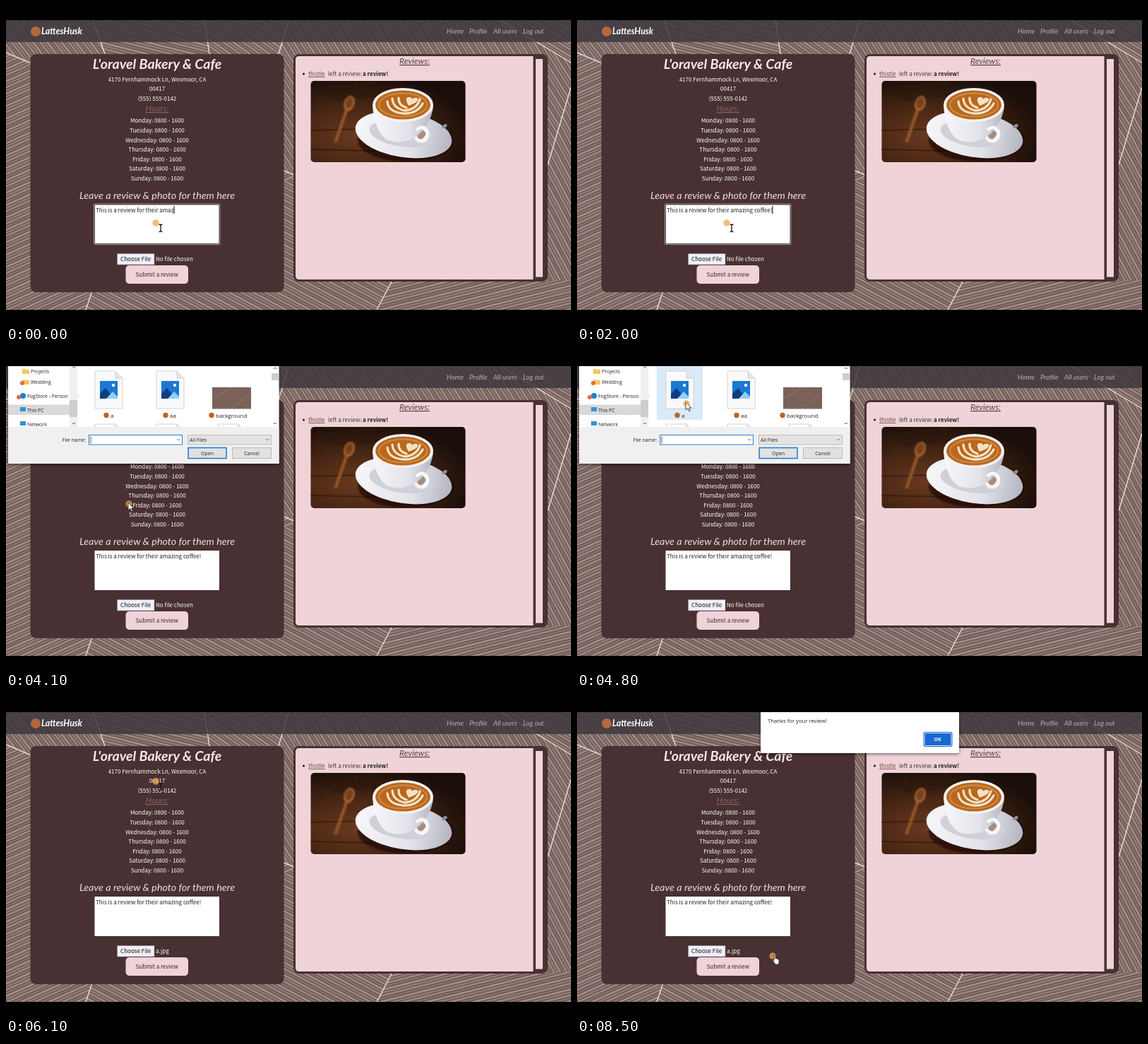
Animation, 800 px wide and 450 px high, one loop 8600 ms. Source, as an HTML page:

```html
<!DOCTYPE html>
<html lang="en">
<head>
<meta charset="utf-8">
<title>Coffee shop review</title>
<style>
  html, body { margin: 0; width: 100%; height: 100%; overflow: hidden; background: #000; }
  svg { display: block; width: 100vw; height: 100vh; }
  text { font: 8.05px "Noto Sans CJK JP", "Noto Sans CJK", "Noto Sans", sans-serif; white-space: pre; }
  .script { font-family: Lato, sans-serif; font-style: italic; }
  .ui text { font-family: "Open Sans", "Noto Sans", sans-serif; font-size: 7px; fill: #222; }
  .mid { text-anchor: middle; }
</style>
</head>
<body>
<svg viewBox="0 0 800 450">
  <defs>
    <clipPath id="photoClip"><rect x="431.500" y="106" width="219" height="115" rx="5"/></clipPath>
    <clipPath id="screen"><rect y="20" width="800" height="410"/></clipPath>
    <clipPath id="files"><rect x="3" y="20" width="372" height="86"/></clipPath>
    <radialGradient id="table" cx=".3" cy=".68" r=".75">
      <stop offset="0" stop-color="#69391f"/><stop offset=".45" stop-color="#4b2815"/>
      <stop offset="1" stop-color="#1a0e09"/>
    </radialGradient>
    <linearGradient id="china"><stop stop-color="#f7f7fa"/><stop offset=".6" stop-color="#e2e2e8"/><stop offset="1" stop-color="#b4b5c0"/></linearGradient>
    <filter id="shadow"><feDropShadow dx="0" dy="1.5" stdDeviation="2" flood-opacity=".5"/></filter>
    <filter id="soft"><feGaussianBlur stdDeviation="1.2"/></filter>
    <g id="page">
      <path d="M0 0H29L39 10V53H0Z" fill="#fafafa" stroke="#c8c8c8" stroke-width=".8"/>
      <path d="M29 0V10H39" fill="#e6e6e6" stroke="#c8c8c8" stroke-width=".8"/>
      <rect x="7" y="14" width="25" height="25" fill="#1a78d2"/>
      <path d="M7 32L15 24L27 39H7Z" fill="#0d3e80"/>
      <path d="M16 39L25 29L32 36V39Z" fill="#8fd0f6"/>
      <circle cx="26" cy="20" r="2.2" fill="#fff"/>
    </g>
  </defs>

  <rect width="800" height="450"/>
  <g clip-path="url(#screen)">
    <g id="wood"></g>
    <path d="M123 20L140 68M281 20L288 68M0 66L410 240M400 20L386 68M700 20L800 80M800 115L767 225M547 388L525 430M122 403L113 430"
      fill="none" stroke="#e8dfdc" stroke-width="1.4"/>
    <rect y="20" width="800" height="31" fill="#3c373e" opacity=".83"/>
    <circle cx="42" cy="36" r="7" fill="#b5673d"/>
    <text class="script" x="50" y="40" fill="#fff" style="font-size:12.4px;font-weight:700">LattesHusk</text>
    <g id="menu" fill="#b9afb2"></g>

    <rect x="34.500" y="68" width="359" height="337" rx="8" fill="#483033"/>
    <g class="mid" fill="#fff">
      <text class="script" x="214" y="88.500" fill="#fbe9e6" style="font-size:19.6px;font-weight:700">L'oravel Bakery &amp; Cafe</text>
      <g id="details"></g>
      <text class="script" x="214" y="149" fill="#83645d" text-decoration="underline" style="font-size:12px">Hours:</text>
      <text class="script" x="214" y="272.500" fill="#f3dcdc" style="font-size:14.3px">Leave a review &amp; photo for them here</text>
    </g>
    <rect x="125.500" y="281" width="176.500" height="56" fill="#fff"/>
    <g id="focus" fill="none">
      <rect x="124.500" y="280" width="178.500" height="57.500" rx="1" stroke="#a39a9e"/>
      <rect x="125.500" y="281" width="176.500" height="55.500" stroke="#4a4548"/>
    </g>
    <text id="review" x="127" y="291.500" fill="#222"></text>
    <rect id="caret" y="283" width="1" height="11" fill="#000"/>
    <rect x="157.500" y="350.500" width="52.500" height="15.500" fill="#eff0f8" stroke="#8d8589" stroke-width=".6"/>
    <text x="162" y="361.200" fill="#111">Choose File</text>
    <text id="fileName" x="212" y="361.200" fill="#fff"></text>
    <rect x="169.500" y="367" width="88.500" height="26" rx="5" fill="#efd3d8"/>
    <text class="mid" x="213.700" y="383" fill="#33262a">Submit a review</text>

    <rect x="407" y="68" width="360" height="322" rx="8" fill="#483033"/>
    <path d="M415 71H746.500V387H415Q410 387 410 382V76Q410 71 415 71ZM750 75H760V383.500H750Z" fill="#efd3d8"/>
    <text class="script mid" x="578.500" y="82" fill="#5b4045" text-decoration="underline" style="font-size:12px">Reviews:</text>
    <circle cx="421.500" cy="96" r="1.600" fill="#222"/>
    <text y="99" fill="#44343a"><tspan x="428" fill="#6c493b" text-decoration="underline">thistle</tspan><tspan x="456">left a review:</tspan><tspan x="505" fill="#222" font-weight="700">a review!</tspan></text>

    <g clip-path="url(#photoClip)">
      <rect x="431" y="106" width="220" height="115" fill="url(#table)"/>
      <path d="M431 176L650 170M431 203L650 208" stroke="#241008" stroke-width="2" opacity=".5"/>
      <g filter="url(#soft)">
        <g id="beans" fill="#2a150c"></g>
        <path d="M484 142L467 191" stroke="#935426" stroke-width="4.500" stroke-linecap="round"/>
        <ellipse cx="486" cy="138" rx="7.500" ry="11" fill="#a3622c" transform="rotate(20 486 138)"/>
        <ellipse cx="486" cy="137" rx="5" ry="8" fill="#74411f" transform="rotate(20 486 137)"/>
        <ellipse cx="566" cy="190" rx="68" ry="30" fill="#160b08" opacity=".6"/>
      </g>
      <ellipse cx="563" cy="182" rx="69" ry="32" fill="url(#china)" transform="rotate(9 563 182)"/>
      <ellipse cx="560" cy="181" rx="46" ry="18" fill="#cfd0d8" transform="rotate(9 560 181)"/>
      <circle cx="588" cy="182" r="9" fill="#a98d80" stroke="#f3f3f6" stroke-width="5"/>
      <path d="M519 141Q522 179 541 190Q560 196 577 187Q600 173 605 143Z" fill="url(#china)"/>
      <path d="M581 176q8 -8 14 -1t-7 17" fill="none" stroke="#f7f7fa" stroke-width="4.500"/>
      <ellipse cx="562" cy="140" rx="43" ry="24" fill="#f4f2f2"/>
      <ellipse cx="562" cy="140" rx="39" ry="20.500" fill="#b8681f"/>
      <ellipse cx="562" cy="140" rx="34" ry="16.500" fill="none" stroke="#d18a42" stroke-width="2"/>
      <g fill="none" stroke="#f4e2c6" stroke-width="3.200" stroke-linecap="round">
        <path d="M540 135Q541 150 562 152M547 131Q548 145 565 148M556 130Q555 140 567 144"/>
        <path d="M590 138Q582 153 562 152M586 132Q582 146 565 148"/>
      </g>
      <path d="M570 141Q563 129 571 129Q575 129 575 132Q579 128 583 131Q585 136 570 141Z" fill="#f4e2c6"/>
      <ellipse cx="621" cy="170" rx="4" ry="2.500" fill="#8d8b94" transform="rotate(-35 621 170)"/>
    </g>

    <g id="dialog" class="ui">
      <path d="M3 10H386.500V158H3Z" fill="#fff" filter="url(#shadow)"/>
      <path d="M3 106H386.500V158H3Z" fill="#f0f0f0"/>
      <g clip-path="url(#files)">
        <path d="M3 74.500H90V89H3Z" fill="#d9d9d9"/>
        <path d="M90 20H101V106H90ZM376 20H386V106H376Z" fill="#f0f0f0"/>
        <path d="M90 68H101V92H90Z" fill="#cdcdcd"/>
        <path d="M23 24h4l1 1h5v6H23ZM23 39h4l1 1h5v6H23Z" fill="#f4c95b"/>
        <circle cx="23" cy="44" r="3" fill="#e5654e"/>
        <circle cx="24" cy="62" r="4" fill="#1783d8"/>
        <circle cx="18" cy="64" r="3" fill="#e5654e"/>
        <path d="M20 78h8v6h-8ZM20 98h8v6h-8Z" fill="#3293d1"/>
        <text x="35" y="29.500">Projects</text><text x="35" y="44.500">Wedding</text>
        <text x="30" y="64.500">FogStore - Person</text>
        <text x="30" y="84.500">This PC</text><text x="30" y="104.500">Network</text>
        <path d="M90 60H103V66H90Z" fill="#f0f0f0"/>
        <rect id="hover" x="113" y="20" width="65" height="76" fill="#d9ebf9"/>
        <use href="#page" x="126" y="27"/><use href="#page" x="213" y="27"/>
        <use href="#page" x="126" y="102"/><use href="#page" x="213" y="102"/><use href="#page" x="300" y="102"/>
        <rect x="292" y="50" width="55" height="30.500" fill="#7a6259"/>
        <path d="M292 66L320 50M320 80L347 58" stroke="#a08a80" stroke-width=".6"/>
        <g id="fileLabels"></g>
      </g>
      <path d="M376 30H386V40H376Z" fill="#cdcdcd"/>
      <path d="M94 22.500l2-2 2 2M94 100l2 2 2-2M379 24l2-2 2 2M379 100l2 2 2-2" fill="none" stroke="#555"/>
      <text x="113" y="127" text-anchor="end">File name:</text>
      <rect x="117.500" y="117.500" width="132" height="13.500" fill="#fff" stroke="#2580cc"/>
      <path d="M120 119.500V129" stroke="#222" stroke-width=".8"/>
      <rect x="257.500" y="117.500" width="118" height="13.500" fill="#e3e3e3" stroke="#b3b3b3" stroke-width=".8"/>
      <text x="260" y="127">All Files</text>
      <path d="M242 123l2 2 2-2M368 123l2 2 2-2" fill="none" stroke="#555" stroke-width=".8"/>
      <rect x="258" y="135.500" width="54" height="15" fill="#e1e1e1" stroke="#1b7ad0" stroke-width="1.500"/>
      <rect x="320.500" y="135.500" width="55" height="15" fill="#e1e1e1" stroke="#adadad" stroke-width=".8"/>
      <text class="mid" x="285" y="145.500">Open</text><text class="mid" x="348" y="145.500">Cancel</text>
    </g>

    <g id="alert" class="ui">
      <rect x="260" y="15" width="281" height="63" rx="2" fill="#fff" filter="url(#shadow)"/>
      <text x="270" y="35" style="font-size:7.7px">Thanks for your review!</text>
      <rect x="490.500" y="48" width="41" height="21" rx="3" fill="#1867d2"/>
      <rect x="492" y="49.500" width="38" height="18" rx="2" fill="none" stroke="#fff" stroke-width=".9"/>
      <text class="mid" x="510.500" y="61" style="fill:#fff;font-weight:700">OK</text>
    </g>

    <g id="pointer">
      <circle id="dot"/>
      <path id="ibeam" d="M4.500 2Q7 2 7 4Q7 2 9.500 2M7 4V11M4.500 12.500Q7 12.500 7 11Q7 12.500 9.500 12.500" fill="none" stroke="#111" stroke-width="1.300"/>
      <path id="arrow" d="M-1 -2V9L1.700 6.600L3.500 10.800L5.300 10L3.500 6H7Z" fill="#fff" stroke="#222" stroke-width=".8"/>
      <path id="hand" d="M2 0Q3 -2 4 0V4Q6 3 6.500 4.500Q9 4 9 6V9Q8.500 11 8 12H4Q2 9 0 6.500Q0 5 2 6.500Z" fill="#fff" stroke="#222" stroke-width=".8"/>
    </g>
  </g>
</svg>
<script>
const el = id => document.getElementById(id);
const show = (id, on) => { el(id).style.display = on ? "" : "none"; };

// Wooden panels: each polygon is filled with slats at its own angle.
const panels = [
  ["0,20 800,20 800,430 0,430", -24],
  ["0,20 123,20 140,68 140,126 0,66", 52],
  ["123,20 281,20 288,68 288,188 140,126 140,68", 14],
  ["281,20 400,20 386,68 386,230 288,188 288,68", 35],
  ["400,20 700,20 800,80 800,115 767,225 547,388 410,240 386,230 386,68", 58],
  ["700,20 800,20 800,80", 31],
  ["113,430 122,403 410,240 547,388 525,430", 28],
  ["767,225 800,115 800,390 767,390", 62],
  ["547,388 800,388 800,430 525,430", -14]
];
const slat = angle => `<pattern id="slat${angle}" width="60" height="16" patternUnits="userSpaceOnUse" patternTransform="rotate(${angle})">
  ${["#a48e87", "#917b75", "#9d8780", "#86706a"].map((tone, i) =>
    `<rect y="${i * 4}" width="60" height="4" fill="${tone}"/><rect y="${i * 4 + 2.9}" width="60" height="1.100" fill="#5d4a47"/>`).join("")}
</pattern>`;
el("wood").innerHTML = panels.map(([points, angle]) =>
  slat(angle) + `<polygon points="${points}" fill="url(#slat${angle})"/>`).join("");

const textAt = (x, y, content, attrs = "") => `<text x="${x}" y="${y}" ${attrs}>${content}</text>`;
el("menu").innerHTML = [[624, "Home"], [656, "Profile"], [690, "All users"], [732, "Log out"]]
  .map(([x, label]) => textAt(x, 39, label, 'class="script" style="font-size:9.7px"')).join("");

const contact = ["4170 Fernhammock Ln, Wexmoor, CA", "00417", "(555) 555-0142"];
const days = ["Monday", "Tuesday", "Wednesday", "Thursday", "Friday", "Saturday", "Sunday"];
el("details").innerHTML =
  contact.map((line, i) => textAt(214, 106.5 + i * 13.5, line)).join("") +
  days.map((day, i) => textAt(214, 165.4 + i * 13.55, day + ": 0800 - 1600")).join("");

el("fileLabels").innerHTML = [[142, "a"], [226, "aa"], [291, "background"]].map(([x, name]) =>
  `<circle cx="${x}" cy="89.500" r="3.700" fill="#b96425"/>` + textAt(x + 6, 92.5, name, 'style="font-size:8px"')).join("");

el("beans").innerHTML = Array.from({ length: 26 }, (_, i) =>
  `<ellipse cx="${455 + i * 47 % 75}" cy="${108 + i * 11 % 24}" rx="5" ry="3" opacity="${0.4 + i % 3 * 0.2}"/>`).join("");

const LOOP = 8600, FRAME = 100;
const TYPED = "This is a review for their amaz", REST = "ing coffee!";
const PRESSES = [3400, 5200, 7800];
const DIALOG_OPEN = 3800, DIALOG_CLOSE = 5400, ALERT = 8000;

// Pointer stops: time, x, y
const stops = [
  [0, 212, 307], [2500, 212, 307], [3200, 193, 357], [3700, 193, 357], [4500, 155, 73],
  [5400, 155, 73], [6100, 212, 118], [7200, 238, 376], [8000, 238, 376], [8500, 277, 365]
];

function pointerAt(t) {
  const next = stops.findIndex(stop => stop[0] > t);
  if (next < 0) return stops[stops.length - 1].slice(1);
  const [t0, x0, y0] = stops[next - 1], [t1, x1, y1] = stops[next];
  const u = (t - t0) / (t1 - t0), ease = u * u * (3 - 2 * u);
  return [x0 + (x1 - x0) * ease, y0 + (y1 - y0) * ease];
}

function cursorKind(t, x, y, dialogOpen) {
  const inside = (left, top, right, bottom) => x > left && x < right && y > top && y < bottom;
  if (dialogOpen) return "arrow";
  if (t >= ALERT || inside(169, 367, 258, 393)) return "hand";
  return inside(125, 281, 302, 337) || inside(148, 97, 280, 250) ? "ibeam" : "arrow";
}

function draw(t) {
  const dialogOpen = t >= DIALOG_OPEN && t < DIALOG_CLOSE;
  const focused = t < PRESSES[0];
  const typing = Math.min(REST.length, Math.floor(t / 160));
  el("review").textContent = TYPED + REST.slice(0, typing);
  el("caret").setAttribute("x", 127 + el("review").getComputedTextLength());
  show("focus", focused);
  show("caret", focused && (t < 2400 || t % 1000 < 500));
  el("fileName").textContent = t < DIALOG_CLOSE ? "No file chosen" : "a.jpg";
  show("dialog", dialogOpen);
  show("hover", t >= 4300);
  show("alert", t >= ALERT);

  const [x, y] = pointerAt(t);
  el("pointer").setAttribute("transform", `translate(${x} ${y})`);
  const kind = cursorKind(t, x, y, dialogOpen);
  ["ibeam", "arrow", "hand"].forEach(id => show(id, id === kind));

  const pressed = PRESSES.some(press => Math.abs(t - press) <= 100);
  const dot = el("dot");
  dot.setAttribute("r", pressed ? 8 : 4.7);
  dot.setAttribute("fill", pressed ? "#a5726b" : "#eea748");
  dot.setAttribute("opacity", pressed ? 0.85 : 0.75);
  el("arrow").setAttribute("opacity", pressed ? 0.4 : 1);
}

function tick() {
  draw(Math.floor(performance.now() % LOOP / FRAME) * FRAME);
  requestAnimationFrame(tick);
}
tick();
</script>
</body>
</html>
```
